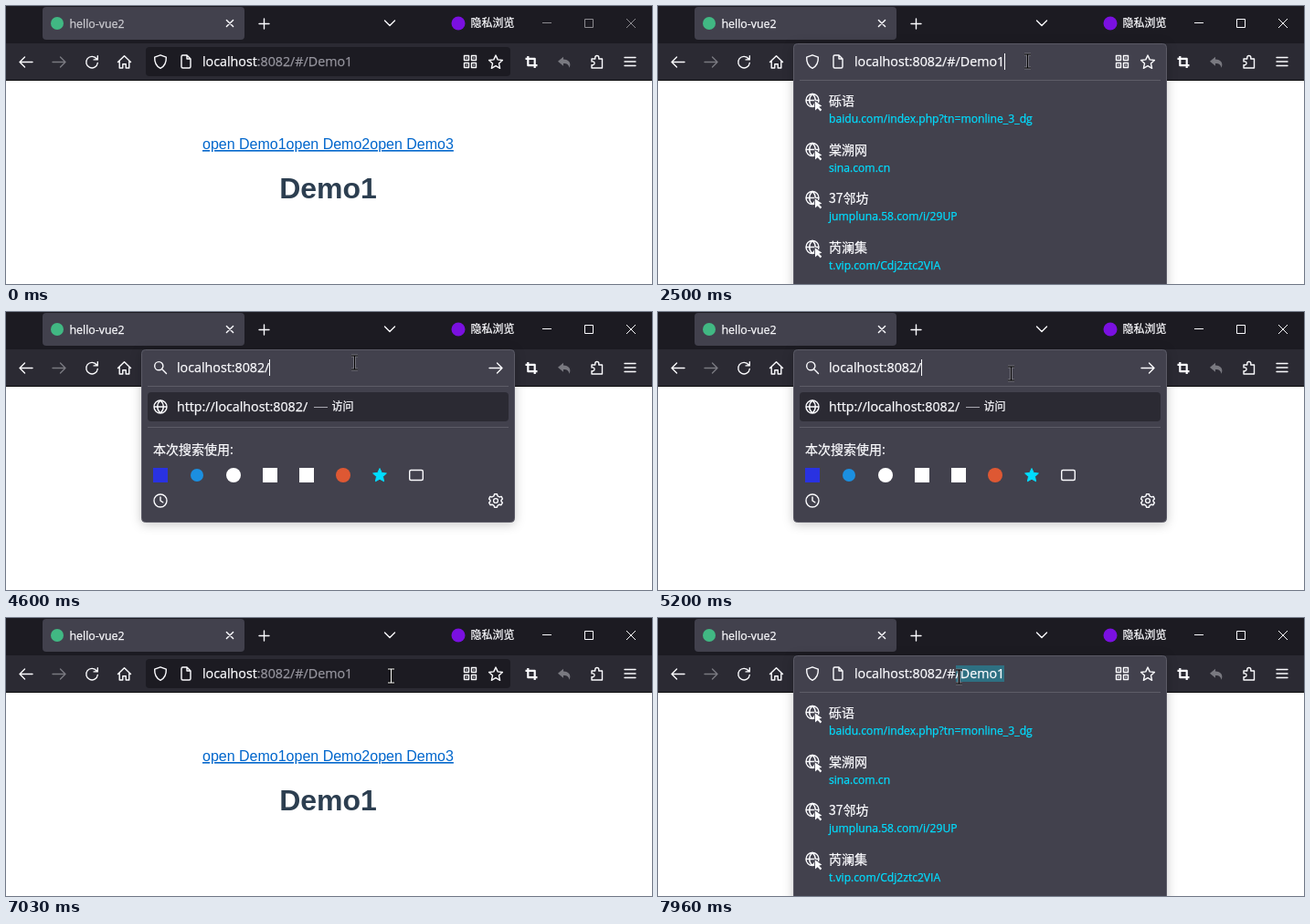
Recreate the animation shown at these times as an HTML page. Size 707x305 px, loop 8 s.

```html
<!DOCTYPE html>
<html lang="zh">
<head>
<meta charset="utf-8">
<title>Address bar</title>
<style>
  html, body { margin: 0; width: 100%; height: 100%; overflow: hidden; background: #fff; }
  svg { display: block; width: 707px; height: 305px; }
  text { font-family: "Open Sans", "Noto Sans CJK SC", "Noto Sans CJK", sans-serif; color: #fbfbfe; white-space: pre; }
  text, tspan { fill: currentColor; stroke: currentColor; stroke-width: .25; }
  .cjk { font-family: "Noto Sans CJK SC", "Noto Sans CJK", sans-serif; }
  .page text { font-family: "Liberation Sans", Arial, sans-serif; stroke: none; }
  .icon { fill: none; stroke: #fbfbfe; stroke-width: 1.4; stroke-linecap: round; stroke-linejoin: round; }
  .dim { opacity: .38; }
  .solid { fill: #fbfbfe; stroke: none; }
  .thick { stroke-width: 2.2; stroke-linecap: butt; }
  .panel { fill: #42414d; stroke: #5b5a66; filter: drop-shadow(0 2px 6px rgba(0,0,0,.22)); }
  .rule { stroke: #5d5c67; }
</style>
</head>
<body>
<svg id="stage" viewBox="0 0 707 305"></svg>
<script>
const LOOP = 8000;
const stage = document.getElementById('stage');

const icon = (x, y, d, cls = '', id = '') =>
  `<path ${id && `id="${id}"`} class="icon ${cls}" transform="translate(${x} ${y})" d="${d}"/>`;
const text = (x, y, size, str, attrs = '') =>
  `<text x="${x}" y="${y}" font-size="${size}" ${attrs}>${str}</text>`;
const box = (x, y, w, h, fill, r = 0, attrs = '') =>
  `<rect x="${x}" y="${y}" width="${w}" height="${h}" fill="${fill}" rx="${r}" ${attrs}/>`;
const dot = (x, y, r, fill, attrs = '') =>
  `<circle cx="${x}" cy="${y}" r="${r}" fill="${fill}" ${attrs}/>`;
const ring = r => `M${-r} 0a${r} ${r} 0 1 0 ${2 * r} 0a${r} ${r} 0 1 0 ${-2 * r} 0`;
const tile = (x, y) => `M${x} ${y}h5v5h-5ZM${x + 2.5} ${y + 2.5}h.1`;

const GLYPH = {
  cross: 'M-3.6 -3.6L3.6 3.6M3.6 -3.6L-3.6 3.6',
  stop: 'M-5.5 -5.5L5.5 5.5M5.5 -5.5L-5.5 5.5',
  plus: 'M-5.5 0H5.5M0 -5.5V5.5',
  chevron: 'M-5.5 -2.5L0 3L5.5 -2.5',
  back: 'M7 0H-7M-1.5 -5.5L-7 0L-1.5 5.5',
  next: 'M-7 0H7M1.5 -5.5L7 0L1.5 5.5',
  reload: 'M5.2 -3.5A6.3 6.3 0 1 0 6.3 1M6.3 -6.8V-2.6H2.1',
  home: 'M-7 0L0 -6.8L7 0M-5.3 -1.5V6.5H-1.7V2.2H1.7V6.5H5.3V-1.5',
  shield: 'M0 -7.2L6.3 -4.8C6.6 1 4 5.3 0 7.4C-4 5.3 -6.6 1 -6.3 -4.8Z',
  file: 'M-5 -5.5Q-5 -7 -3.5 -7H1L5 -3V5.5Q5 7 3.5 7H-3.5Q-5 7 -5 5.5ZM1 -7V-3H5',
  star: 'M0 -7.4L2.2 -2.6L7.4 -2L3.5 1.6L4.6 6.8L0 4.2L-4.6 6.8L-3.5 1.6L-7.4 -2L-2.2 -2.6Z',
  grid: tile(-6.5, -6.5) + tile(1.5, -6.5) + tile(-6.5, 1.5) + tile(1.5, 1.5),
  crop: 'M-3.7 -6.5V3.7H6.5M-6.5 -3.7H3.7V6.5',
  undo: 'M-1 -5.8L-7 -.8L-1 4.2V1.4C3 1.2 5 2.6 5.6 6.2C8 1.5 5 -3 -1 -3Z',
  puzzle: 'M-6 -3.5H-2.2V-5A2 2 0 0 1 1.8 -5V-3.5H5.5V6.5H-6V3.2H-4.3A2 2 0 0 0 -4.3 -.6H-6Z',
  menu: 'M-6 -4.5H6M-6 0H6M-6 4.5H6',
  search: 'M1.3 1.3L6.5 6.5M-6.3 -1.8a4.6 4.6 0 1 0 9.2 0a4.6 4.6 0 1 0 -9.2 0',
  globe: ring(7) + 'M-7 0H7M0 -7C-4.4 -3 -4.4 3 0 7C4.4 3 4.4 -3 0 -7',
  clock: ring(7) + 'M0 -4V0L2.8 1.8',
  gear: ring(2.4) + 'M-1.4 -7.2H1.4L2 -5.2L4.2 -4L6.2 -4.6L7.4 -2L6 -.5V.8L7.4 2.2L6 4.7L4 4.2L2 5.4L1.4 7.2H-1.4L-2 5.4L-4 4.2L-6 4.7L-7.4 2.2L-6 .8V-.5L-7.4 -2L-6.2 -4.6L-4.2 -4L-2 -5.2Z',
  pointer: 'M0 0V8L2.1 6.2L4.6 8.7L5.8 7.4L3.4 5L5.9 4.2Z',
};

const SITES = [
  ['砾语', 'baidu.com/index.php?tn=monline_3_dg'],
  ['棠溯网', 'sina.com.cn'],
  ['37邻坊', 'jumpluna.58.com/i/29UP'],
  ['芮澜集', 't.vip.com/Cdj2ztc2VIA'],
];

const siteRow = ([name, url], i) => `<g transform="translate(0 ${Math.round(i * 53.6)})">
  ${icon(169, 103.5, GLYPH.globe)}
  <path d="${GLYPH.pointer}" transform="translate(172 104.5) scale(1.25)" fill="#fbfbfe" stroke="#42414d" stroke-width="1.2" paint-order="stroke"/>
  ${text(187, 109, 14, name, 'class="cjk"')}
  ${text(187, 128.3, 12.13, url, 'style="color:#00ddff"')}</g>`;

const rule = y => `<path class="rule" d="M155 ${y}H550"/>`;

stage.innerHTML = `
<defs><clipPath id="tabClip">${box(40, 1, 221, 36, '#000', 4)}</clipPath></defs>
${box(0, 0, 707, 305, '#fff')}
<g class="page">
  ${text(215, 157, 16, 'open Demo1open Demo2open Demo3', 'style="color:#0066cc" text-decoration="underline"')}
  ${text(352.5, 211, 32, 'Demo1', 'style="color:#2c3e50" font-weight="700" text-anchor="middle"')}
</g>
${box(0, 0, 707, 41, '#1c1b22')}
${box(0, 41, 707, 40, '#2b2a33')}
${box(0, 81, 707, 1, '#0c0c0d')}
${box(40, 1, 221, 36, '#42414d', 4)}
<g clip-path="url(#tabClip)">${dot(56, 19, 0, '#00ddff', 'id="burst"')}</g>
${dot(56, 19, 7, '#41b883', 'id="favicon"')}
${dot(56, 19, 3, '#00ddff', 'id="throbber"')}
${text(69.5, 23.6, 12.4, '', 'id="title"')}
${icon(245, 19, GLYPH.cross)}${icon(282.5, 19.5, GLYPH.plus)}${icon(420, 18.5, GLYPH.chevron)}
${dot(495, 19, 7.5, '#7a10e0')}
${text(508.5, 23.3, 12, '隐私浏览', 'class="cjk"')}
<g id="controls">
  ${['M-5 0H5', 'M-4.5 -4.5H4.5V4.5H-4.5Z', 'M-5 -5L5 5M5 -5L-5 5'].map((d, i) =>
    `<path d="${d}" transform="translate(${592 + 46 * i} ${i ? 19 : 18.5})" fill="none" stroke="#fbfbfe"/>`).join('')}
</g>
${icon(22, 61.5, GLYPH.back)}${icon(58, 61.5, GLYPH.next, 'dim')}
${icon(94, 61.5, GLYPH.reload, '', 'reload')}${icon(94, 61.5, GLYPH.stop, '', 'stop')}
${icon(129.5, 61.5, GLYPH.home)}
${icon(575, 61.5, GLYPH.crop, 'thick')}
${icon(611, 61.5, GLYPH.undo, 'solid dim')}
${icon(647, 61.5, GLYPH.puzzle)}${icon(683, 61, GLYPH.menu)}
${box(153, 45, 399, 32, '#1c1b22', 4, 'id="idleBar"')}
<rect id="panel" class="panel" x="148.5" y="41.5" width="408" height="39" rx="4"/>
<g id="siteList">${rule(81.5)}${SITES.map(siteRow).join('')}</g>
<g id="searchList">
  ${rule(81.5)}${box(155, 88, 395, 32, '#2b2a33', 4)}
  ${icon(169, 104, GLYPH.globe)}
  ${text(187, 109, 14.25, 'http://localhost:8082/')}
  <path d="M337 104.5H352" stroke="#a9a8b0"/>
  ${text(356.5, 108.3, 12, '访问', 'class="cjk"')}
  ${rule(126.5)}
  ${text(161, 156, 14, '本次搜索使用:', 'class="cjk"')}
  ${box(161, 171, 16, 16, '#2932e1')}${dot(209, 179, 7, '#1b8fe0')}
  ${dot(249, 179, 8, '#fff')}${box(281, 171, 16, 16, '#fff')}${box(321, 171, 16, 16, '#fff')}
  ${dot(369, 179, 8, '#de5833')}
  <path d="${GLYPH.star}" transform="translate(409 179)" fill="#00ddff" stroke="#00ddff" stroke-linejoin="round"/>
  ${icon(449, 179, 'M-7.3 -4Q-7.3 -5.5 -5.8 -5.5H5.8Q7.3 -5.5 7.3 -4V4Q7.3 5.5 5.8 5.5H-5.8Q-7.3 5.5 -7.3 4Z')}
  ${icon(169, 207, GLYPH.clock)}${icon(536, 207, GLYPH.gear)}
</g>
<g id="siteIcons">
  ${icon(169, 61, GLYPH.shield)}${icon(197, 61, GLYPH.file)}
  ${icon(508, 61, GLYPH.grid)}${icon(536, 61.5, GLYPH.star)}
</g>
<g id="searchIcons">${icon(169, 61, GLYPH.search)}${icon(536, 61.5, GLYPH.next)}</g>
${box(0, 52, 0, 18, '#2e7082', 0, 'id="selection"')}
<text id="url" y="66" font-size="14.25"><tspan>localhost</tspan><tspan id="rest"></tspan></text>
${box(0, 52, 1, 18, '#fbfbfe', 0, 'id="caret"')}
<g id="beam" fill="none">
  ${['beamEdge', 'beamCore'].map(id =>
    `<path id="${id}" d="M-3.5 -7.5H3.5M-3.5 7.5H3.5M0 -7.5V7.5"/>`).join('')}
</g>
<path id="arrow" d="M0 0V16.5L3.8 13L6.3 18.8L8.9 17.7L6.4 12H11.6Z" fill="#fff" stroke="#000"/>`;

const el = {};
stage.querySelectorAll('[id]').forEach(n => el[n.id] = n);
const show = (id, on) => { el[id].style.display = on ? '' : 'none'; };
const set = (id, attrs) => { for (const k in attrs) el[id].setAttribute(k, attrs[k]); };

// time, x, y of the mouse
const PATH = [
  [500, 531, 306], [850, 510, 170], [1050, 455, 78], [1200, 388, 63],
  [1760, 388, 63], [2030, 404, 60], [2530, 404, 60], [3300, 326, 62],
  [3330, 326, 62], [3430, 322, 59], [3830, 322, 59], [4030, 381, 55],
  [4860, 381, 55], [5030, 386, 67], [6600, 386, 67], [6730, 421, 63],
  [7030, 421, 63], [7200, 407, 63], [7540, 407, 63], [7960, 329, 64],
];

function mouseAt(t) {
  const i = PATH.findIndex(p => p[0] > t);
  if (i === 0) return [531, 340];
  if (i < 0) return PATH[PATH.length - 1].slice(1);
  const [a, b] = [PATH[i - 1], PATH[i]];
  const k = (t - a[0]) / (b[0] - a[0]);
  return [1, 2].map(n => Math.round(a[n] + (b[n] - a[n]) * k));
}

// first selected character when dragging from the end of the address to x
function dragStart(x, length) {
  for (let i = 0; i < length; i++) {
    const mid = (el.url.getStartPositionOfChar(i).x + el.url.getEndPositionOfChar(i).x) / 2;
    if (x - 1.3 < mid) return i;
  }
  return length;
}

function draw(t) {
  const between = (a, b) => t >= a && t < b;
  const search = between(4560, 5530);
  const edit = between(1460, 4560) || t >= 7500;
  const open = search || edit;
  const loading = between(5530, 6130);
  const active = t >= 1460;
  const [mx, my] = mouseAt(t);

  const fresh = between(5530, 5830);
  el.title.textContent = fresh ? 'localhost:8082/' : 'hello-vue2';
  el.title.style.opacity = active ? 1 : .75;
  el.controls.style.opacity = active ? 1 : .5;
  show('favicon', !loading);
  show('throbber', loading);
  set('throbber', { cx: 56 + 4.5 * Math.sin((t - 5530) / 130) });
  const burst = (t - 6130) / 200;
  show('burst', burst >= 0 && burst < 1);
  set('burst', { r: Math.max(0, burst) * 110, opacity: .35 * (1 - burst) });
  show('stop', between(5530, 6360));
  show('reload', !between(5530, 6360));
  el.reload.style.opacity = between(6360, 6600) ? .4 : 1;

  const sites = between(1500, 4600) || t >= 7540;
  const results = between(4600, 5530);
  show('idleBar', !open);
  show('panel', open);
  set('panel', { height: sites ? 280 : results ? 189 : 39 });
  show('siteList', sites);
  show('searchList', results);
  show('siteIcons', !search);
  show('searchIcons', search);

  const rest = search || fresh ? ':8082/' : ':8082/#/Demo1';
  el.rest.textContent = rest;
  el.rest.style.color = open ? '#fbfbfe' : '#96959e';
  set('url', { x: search ? 187 : 215 });

  const length = 9 + rest.length;
  const end = el.url.getEndPositionOfChar(length - 1).x;
  let start = length;
  if (between(1460, 2500)) start = 0;
  else if (between(2500, 3830) || t >= 7500) start = dragStart(mx, length);
  else if (edit) start = dragStart(322, length);
  const selected = edit && start < length;
  show('selection', selected);
  if (selected) {
    const left = Math.round(el.url.getStartPositionOfChar(start).x);
    set('selection', { x: left, width: Math.round(end) - left });
  }
  show('caret', (edit && !selected) || (search && !between(4700, 5200)));
  set('caret', { x: Math.round(end) });

  const inBar = my < 81;
  show('beam', inBar);
  show('arrow', !inBar);
  set('beam', { transform: `translate(${mx + .5} ${my + .5})` });
  set('arrow', { transform: `translate(${mx} ${my})` });
  set('beamEdge', { stroke: open ? '#77767f' : '#0c0c0d', 'stroke-width': 3 });
  set('beamCore', { stroke: open ? '#000' : '#fff', 'stroke-width': 1 });
}

const begin = performance.now();
function tick() {
  draw((performance.now() - begin) % LOOP);
  requestAnimationFrame(tick);
}
tick();
</script>
</body>
</html>
```
